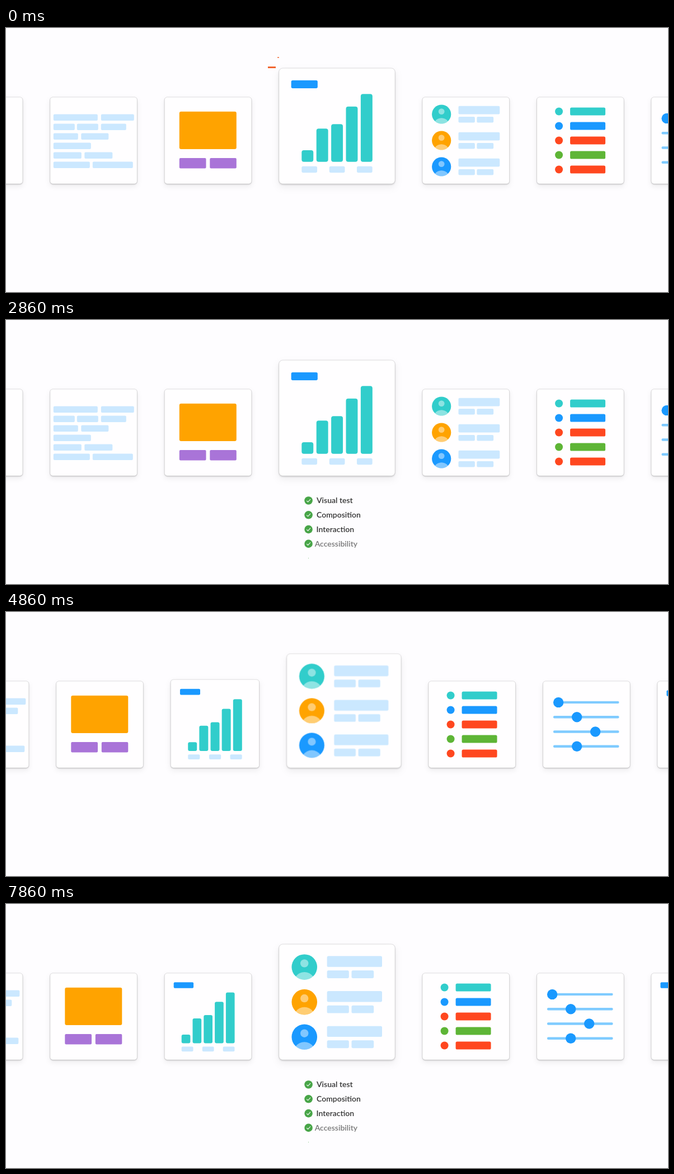
An HTML page that plays this animation: 1183x473 px, repeating every 8000 ms.

```html
<!DOCTYPE html>
<html lang="en">
<head>
<meta charset="utf-8">
<title>Component checks</title>
<style>
  html, body { margin: 0; width: 100%; height: 100%; overflow: hidden; background: #fefdff; }
  svg { display: block; width: 1183px; height: 473px; }
  .card {
    fill: #fffeff; stroke: rgba(0, 0, 0, .11); vector-effect: non-scaling-stroke;
    filter: drop-shadow(0 1px 1px rgba(0, 0, 0, .18)) drop-shadow(0 4px 5px rgba(0, 0, 0, .07));
  }
  text { font: 600 14px Lato, "Open Sans", sans-serif; fill: #333; }
</style>
</head>
<body>
<svg id="stage" viewBox="0 0 1183 473">
  <defs>
    <filter id="smear" filterUnits="userSpaceOnUse" x="-400" y="0" width="2000" height="473" color-interpolation-filters="sRGB">
      <feGaussianBlur id="smearBlur" stdDeviation="0 0"/>
    </filter>
    <linearGradient id="trail" x1="0" y1="0" x2="0" y2="1">
      <stop offset="0" stop-color="#f4662f" stop-opacity=".32"/>
      <stop offset=".5" stop-color="#f4662f" stop-opacity=".17"/>
      <stop offset="1" stop-color="#f4662f" stop-opacity="0"/>
    </linearGradient>
  </defs>
  <g id="strip"></g>
  <g id="scan"></g>
  <g id="list"></g>
</svg>
<script>
const LOOP = 8000, CYCLE = 5000, STEP = 1000 / 7;
const SMALL = 155.5, GROW = 51.8, PITCH = 204.5, BASE = 279.3;
const TEAL = '#31cdcb', BLUE = '#1a99ff', RED = '#ff471f', GREEN = '#5eb536',
      ORANGE = '#ffa300', PURPLE = '#a974d8', PALE = '#cbe8ff', SKY = '#7fcbff', SCAN = '#f1652f';

const $ = id => document.getElementById(id);
const clamp = (v, a = 0, b = 1) => Math.min(b, Math.max(a, v));
const span = (t, from, length) => clamp((t - from) / length);
const inOut = (u, n = 2) => u < .5 ? (2 * u) ** n / 2 : 1 - (2 - 2 * u) ** n / 2;

const bar = (x, y, w, h, fill, r = 2) =>
  `<rect x="${x}" y="${y}" width="${w}" height="${h}" rx="${r}" fill="${fill}"/>`;
const dot = (x, y, r, fill) => `<circle cx="${x}" cy="${y}" r="${r}" fill="${fill}"/>`;
const each = (items, draw) => items.map(draw).join('');

// Card contents, in the units of a small card
const words = () => each([
  [[6, 79], [91, 59]],
  [[6, 38], [48, 38], [91, 45]],
  [[6, 44], [55.5, 49]],
  [[6, 67]],
  [[6, 50], [61.5, 50]],
  [[6, 65], [76, 72]]
], (row, i) => each(row, ([x, w]) => bar(x, 30.8 + 17 * i, w, 11.4, PALE)));

const picture = () => bar(26.5, 26, 102, 67.3, ORANGE, 3) +
  bar(26.5, 109.2, 47.7, 18.4, PURPLE) + bar(81, 109.2, 47.5, 18.4, PURPLE);

const chart = () => bar(16.4, 16.4, 35.4, 10.6, BLUE) +
  each([110.2, 81.2, 75.2, 51.5, 34.6], (top, i) => bar(30.4 + 19.8 * i, top, 15.7, 125.8 - top, TEAL, 3)) +
  each([30.4, 67.5, 104.4], x => bar(x, 131.8, 20.8, 8.6, PALE));

const person = (fill, i) => {
  const y = 30.7 + 47 * i;
  return `<g transform="translate(34.1 ${y})">${dot(0, 0, 17.1, fill)}
    <g fill="#fff" fill-opacity=".45"><circle cy="-4.9" r="5.4"/>
    <path d="M-11.6 12.6A14.5 14.5 0 0 1 11.6 12.6A17.1 17.1 0 0 1 -11.6 12.6Z"/></g></g>` +
    bar(64.4, y - 14.7, 73.8, 14.6, PALE) +
    bar(64.4, y + 4.6, 29.4, 10.4, PALE) + bar(97.3, y + 4.6, 29.8, 10.4, PALE);
};
const people = () => each([TEAL, ORANGE, BLUE], person);

const rows = () => each([TEAL, BLUE, RED, GREEN, RED], (fill, i) =>
  dot(39.5, 25.7 + 26 * i, 7, fill) + bar(59.5, 18.7 + 26 * i, 63, 14, fill, 2.6));

const sliders = () => each([27.6, 60.6, 93.6, 60.6], (x, i) =>
  bar(18.4, 35.9 + 26.3 * i, 117.6, 4.4, SKY) + dot(x, 38.1 + 26.3 * i, 9.2, BLUE));

const cards = [chart, words, picture, chart, people, rows, sliders, chart];
$('strip').innerHTML = each(cards, draw =>
  `<g><rect class="card" width="${SMALL}" height="${SMALL}" rx="5"/>${draw()}</g>`);
const cardNodes = [...$('strip').children];

// Scan lines share one drawing along x; the second has its axes swapped
$('scan').innerHTML = '<g></g><g></g>';
const scanNodes = [...$('scan').children];
scanNodes.forEach(g => {
  g.innerHTML = `<rect height="16" fill="url(#trail)"/><rect y="-1.5" height="3" fill="${SCAN}"/>`;
});

const checks = ['Visual test', 'Composition', 'Interaction', 'Accessibility', 'User flow'];
$('list').innerHTML = each(checks, (label, i) =>
  `<g transform="translate(540.6 ${323.5 + 25.8 * i})"><g>${dot(0, 0, 7.3, '#48a548')}
   <path d="M-3.3 .3L-1 2.5L3.5 -2.4" fill="none" stroke="#fff" stroke-width="1.1"/></g>
   <text y="4.8">${label}</text></g>`);
const checkNodes = [...$('list').children];

const slideAt = t => inOut(span(t, 4200, 862), 3);
const sweepAt = c => 210 * (inOut(span(c, 100, 430)) - inOut(span(c, 530, 470)));

function drawCards(t) {
  const p = slideAt(t);
  cardNodes.forEach((g, i) => {
    const s = i - 3 - p;
    const left = 487.8 + PITCH * s + GROW * clamp(s);
    const width = SMALL + GROW * clamp(1 - Math.abs(s));
    g.setAttribute('transform', `translate(${left} ${BASE - width}) scale(${width / SMALL})`);
  });
  const speed = (slideAt(t + 5) - slideAt(t - 5)) * PITCH / 10;
  if (speed > .03) {
    $('smearBlur').setAttribute('stdDeviation', `${4.4 * speed} 0`);
    $('strip').setAttribute('filter', 'url(#smear)');
  } else {
    $('strip').removeAttribute('filter');
  }
}

function drawScan(c) {
  const pos = sweepAt(c);
  const speed = (sweepAt(c + 5) - sweepAt(c - 5)) / 10;
  const tail = clamp(-speed / .55, -1.2, 1.2);
  const places = [`translate(468 ${70.5 + pos})`, `matrix(0 1 1 0 ${486.5 + pos} 52)`];
  scanNodes.forEach((g, i) => {
    const length = 247.5 * (inOut(span(c, i ? -12 : -37, 220)) - inOut(span(c, 1000, 270)));
    const [glow, line] = g.children;
    g.setAttribute('transform', places[i]);
    glow.setAttribute('width', length);
    glow.setAttribute('transform', `scale(1 ${tail})`);
    line.setAttribute('width', length);
  });
}

function drawChecks(c) {
  $('list').setAttribute('opacity', 1 - span(c, 3860, 280));
  checkNodes.forEach((g, i) => {
    const age = c - 1500 - 330 * i;
    const [icon, label] = g.children;
    icon.setAttribute('transform', `scale(${inOut(span(age, 0, 200))})`);
    label.setAttribute('x', 14.4 - 4 * (1 - inOut(span(age, 150, 740))));
    label.setAttribute('opacity', span(age, 150, 330));
  });
}

const start = performance.now();
function frame() {
  const now = (performance.now() - start) % LOOP;
  // Seven pictures a second
  const t = Math.floor((now + 5) / STEP) % 56 * STEP;
  const c = (t + .01) % CYCLE;
  drawCards(t);
  drawScan(c);
  drawChecks(c);
  requestAnimationFrame(frame);
}
frame();
</script>
</body>
</html>
```
